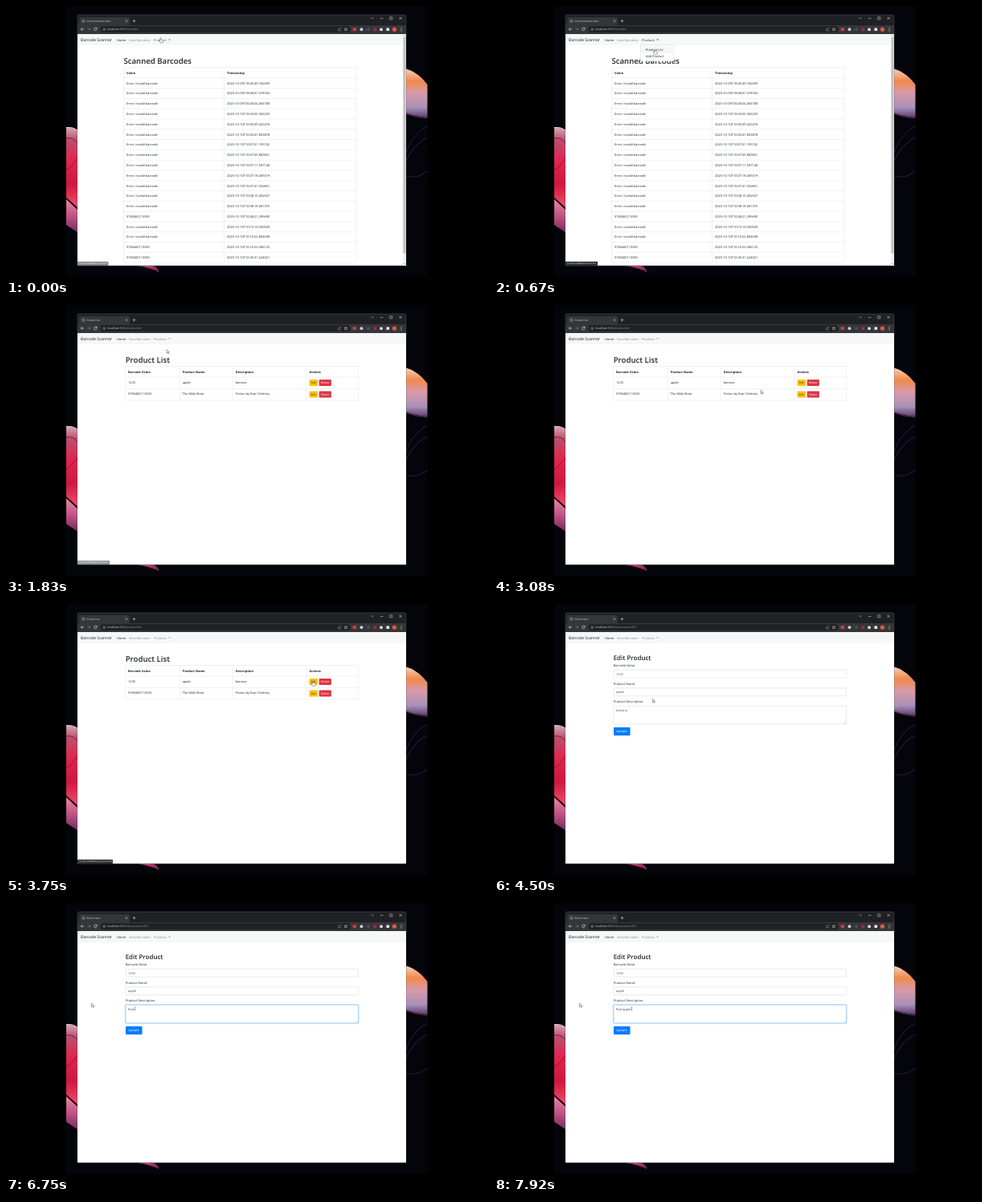
An HTML page that plays this animation: 600x338 px, repeating every 8000 ms.

```html
<!DOCTYPE html>
<html lang="en">
<head>
<meta charset="utf-8">
<title>Barcode Scanner</title>
<style>
html, body { margin: 0; width: 100%; height: 100%; overflow: hidden; background: #000; }
svg { display: block; width: 100vw; height: 100vh; }
text { font-family: "Open Sans", "Noto Sans", sans-serif; text-rendering: geometricPrecision; white-space: pre; }
</style>
</head>
<body>
<svg id="stage" viewBox="0 0 600 338"></svg>
<script>
const LOOP = 8000;
const INK = '#212529', LINE = '#dee2e6', GREY = '#9aa0a6', BAR = '#35363a', DARK = '#202124';

const rect = (x, y, w, h, fill, extra = '') =>
  `<rect x="${x}" y="${y}" width="${w}" height="${h}" fill="${fill}" ${extra}/>`;
const text = (x, y, s, size = 3.95, fill = INK, extra = '') =>
  `<text x="${x}" y="${y}" font-size="${size}" fill="${fill}" ${extra}>${s}</text>`;
const path = (d, stroke, width = 0.6, extra = 'fill="none"') =>
  `<path d="${d}" stroke="${stroke}" stroke-width="${width}" ${extra}/>`;
const dot = (x, y, r, fill, extra = '') => `<circle cx="${x}" cy="${y}" r="${r}" fill="${fill}" ${extra}/>`;
const group = (id, body, extra = '') => `<g id="${id}" ${extra}>${body}</g>`;
const gradient = (id, stops, dir) => `<linearGradient id="${id}" ${dir}>` +
  stops.map(([o, c]) => `<stop offset="${o}" stop-color="${c}"/>`).join('') + '</linearGradient>';

const bold = 'font-weight="700"', semi = 'font-weight="600"';

function wallpaper() {
  return '<defs>' +
    gradient('leftTop', [[0, '#d9a3b4'], [0.15, '#b8506f'], [0.4, '#e0264e'], [0.7, '#cf1740'], [1, '#f0506c']], 'x2="0" y2="1"') +
    gradient('leftLow', [[0, '#e8889f'], [0.5, '#c05285'], [1, '#702a5c']], 'x2="0" y2="1"') +
    gradient('right', [[0, '#f7d2c4'], [0.25, '#f08a4c'], [0.5, '#d99aa8'], [0.8, '#a890b8'], [1, '#5d3f70']], 'x2="0" y2="1"') +
    gradient('foot', [[0, '#3a1230'], [0.6, '#d13a70'], [1, '#7a2350']], '') +
    '</defs>' +
    rect(0, 0, 600, 338, '#000') + rect(75, 0, 450, 338, '#04040b') +
    path('M75 152Q84 151 90 156V252L75 239Z', 'none', 0, 'fill="url(#leftTop)"') +
    path('M75 151.5Q84 150.500 90 156', '#e5d3dc', 1) +
    path('M75 165Q84 163 90 172M75 205Q83 200 90 188', '#8c1238', 1) +
    path('M75 241L90 255V283L75 273Z', 'none', 0, 'fill="url(#leftLow)"') +
    path('M75 240L90 253.500', '#2b0c20', 1.4) +
    path('M497 78Q514 83 524.500 98V139Q510 138 497 133Z', 'none', 0, 'fill="url(#right)"') +
    path('M497 134Q510 139 524.500 140', '#6a3358', 1) +
    path('M497 186Q505 160 524.500 150M497 212Q512 216 524.500 206M497 196Q507 172 524.500 164', '#2a1238', 1.2) +
    path('M155 323H182Q191 327 190 332Q182 326 155 323Z', 'none', 0, 'fill="url(#foot)"');
}

function browser() {
  const white = '#e8eaed';
  return rect(89, 11, 409, 313, DARK, 'rx="1.5" stroke="#55565a" stroke-width=".5"') +
    rect(91, 14, 63, 11, BAR, 'rx="1.8"') + rect(89, 24, 409, 11, BAR) +
    dot(96.500, 18.800, 1.6, 'none', 'stroke="#c4c7cb" stroke-width=".6"') +
    text(100.500, 20, '', 3, white, 'id="tab"') +
    path('M148.700 17.500l2.400 2.400m0-2.400l-2.400 2.400M157.500 18.700h4m-2-2v4', white, 0.5) +
    path('M454.700 14.500l1.500 1.400 1.500-1.400M466 15.500h3.400M477.800 13.800h3v3h-3zM489.500 13.700l3.200 3.200m0-3.200l-3.200 3.200', white, 0.5) +
    path('M97 29h-3.800m1.700-1.700l-1.700 1.700 1.700 1.700', white, 0.6) +
    path('M101.300 29h3.800m-1.700-1.700l1.700 1.700-1.700 1.700', '#85888c', 0.6) +
    path('M112.900 28a1.800 1.800 0 1 0 .2 1.500m0-2.700v1.500h-1.500', white, 0.6) +
    rect(117.500, 25.300, 311, 7.800, DARK, 'rx="3.900"') +
    dot(122.200, 29.200, 1.4, 'none', 'stroke="#b6b9bd" stroke-width=".5"') +
    path('M122.200 29v.9', '#b6b9bd', 0.5) +
    `<text x="126.300" y="30.400" font-size="3.4" fill="${white}">localhost<tspan id="url" fill="${GREY}"></tspan></text>` +
    path('M413.500 28.200v2.600h3v-1.200M414.700 29.300q.5-1.700 2.200-1.700m-.9-.9l1 .9-1 .9', GREY, 0.5) +
    path('M423 27l.6 1.400 1.500.1-1.100 1 .3 1.500-1.300-.8-1.300.8.3-1.500-1.100-1 1.500-.1z', '#d0d2d5', 0.5) +
    rect(431.700, 27.200, 4.200, 3.800, '#d93a3f') + dot(442.500, 29.200, 1.9, '#cfd2d6') +
    dot(451, 29.200, 1.6, '#55585c') + rect(457.300, 27.300, 3.600, 3.800, '#b3242a') +
    rect(465.500, 27.700, 3.200, 3.200, '#f1f3f4') + rect(473.500, 27.500, 3.600, 3.400, '#f1f3f4') +
    dot(483.500, 29.200, 2.6, '#e2593a') +
    [27.5, 29.2, 30.9].map(y => dot(492, y, 0.5, white)).join('') +
    rect(89, 35, 409, 288.700, '#fff') + rect(89, 35, 409, 14, '#f5f8f7') +
    text(93, 44, 'Barcode Scanner', 4.95, '#191b1d') +
    text(138, 43.700, 'Home', 3.95, '#191b1d') +
    text(153, 43.700, 'View Barcodes', 3.95, '#8a8c8c') +
    group('menuLabel', text(184, 43.700, 'Products', 3.95, 'currentColor') +
      '<path d="M202.400 41.600h2.500l-1.250 1.300z" fill="currentColor"/>');
}

const CODE = '9780400113390';
const STAMPS = ('09T18:06:49.746939 09T18:08:01.378763 09T20:00:44.464708 10T10:04:55.302233 ' +
  '10T10:05:09.425374 10T10:05:47.853878 10T10:07:01.195742 10T10:07:05.883831 10T10:07:11.597148 ' +
  '10T10:07:18.405519 10T10:07:41.326851 10T10:08:15.402927 10T10:08:18.281575 10T10:08:21.295690 ' +
  '10T10:10:19.550029 10T10:10:22.804638 10T10:10:25.496125 10T10:35:31.224021').split(' ');

function grid(xs, ys) {
  const [l, r] = [xs[0], xs[xs.length - 1]], [t, b] = [ys[0], ys[ys.length - 1]];
  return path(xs.map(x => `M${x} ${t}V${b}`).join('') + ys.map(y => `M${l} ${y}H${r}`).join(''), LINE, 0.5);
}

function scansPage() {
  const step = 12.79, lines = [76.7];
  let body = text(146.500, 72.300, 'Scanned Barcodes', 9.6, INK, semi) +
    text(150, 84.600, 'Value', 3.95, INK, bold) + text(275, 84.600, 'Timestamp', 3.95, INK, bold);
  STAMPS.forEach((stamp, i) => {
    const y = 97.6 + i * step;
    const ok = i === 13 || i > 15;
    body += text(150, y, ok ? CODE : 'Error: invalid barcode', 3.88) + text(275, y, '2023-10-' + stamp, 3.98);
  });
  for (let i = 0; i <= STAMPS.length; i++) lines.push(89.9 + i * step);
  return grid([146.7, 271.5, 436], lines) + body +
    rect(494, 35, 4, 288.700, '#f1f1f1') + rect(494.500, 39, 3, 269.500, '#c1c1c1') +
    path('M495 37.500l1-1.200 1 1.200zM495 321.300l1 1.200 1-1.200z', 'none', 0, 'fill="#777"');
}

function listPage() {
  const cols = [152, 219.7, 285.7, 377.5];
  const row = (y, cells, extra) => cells.map((s, i) => text(cols[i], y, s, 3.9, INK, extra)).join('');
  const buttons = y => rect(377.500, y, 10.700, 8, '#ffc107', 'rx="1"') + text(379.700, y + 5.2, 'Edit', 3.4) +
    rect(389.700, y, 15.200, 8, '#dc3545', 'rx="1"') + text(391.700, y + 5.2, 'Delete', 3.45, '#fff');
  return text(148.700, 72.300, 'Product List', 9.65, INK, semi) +
    grid([149, 216.3, 282.3, 374, 438.5], [76.5, 90, 104.5, 119]) +
    row(84.6, ['Barcode Value', 'Product Name', 'Description', 'Actions'], bold) +
    row(97.7, ['1235', 'apple', 'banana']) + buttons(93) +
    row(112.2, [CODE, 'The Mild Oboe', 'Fiction by Evan Tolmery']) + buttons(107.6);
}

function editPage() {
  const box = (y, h, extra = '') => rect(149, y, 289.500, h, '#fff', `rx="1" stroke="#ced4da" stroke-width=".5" ${extra}`);
  return text(148.700, 70, 'Edit Product', 7.95, INK, semi) +
    text(148.800, 78.400, 'Barcode Value:') + box(82.3, 9.8) + text(152, 88.700, '1235', 3.95, '#495057') +
    text(148.800, 100.900, 'Product Name:') + box(104.8, 9.8) + text(152, 111.200, 'apple', 3.95, '#495057') +
    text(148.800, 123.400, 'Product Description:') +
    rect(148.500, 126.700, 290.500, 23.500, 'none', 'id="glow" rx="1.4" stroke="#bfdeff" stroke-width="1.3"') +
    box(127.2, 22.5, 'id="area"') +
    path('M435.800 149l2-2m-.7 2l.7-.7', '#8a8a8a', 0.35) +
    '<rect id="mark" y="129.200" height="5.800" fill="#2747b0"/>' +
    '<text x="152" y="133.700" font-size="3.950" fill="#495057"><tspan id="plain"></tspan><tspan id="picked" fill="#fff"></tspan></text>' +
    rect(0, 129.400, 0.45, 5.200, '#111', 'id="caret"') +
    rect(149, 153.800, 20.500, 10.200, '#007bff', 'rx="1"') + text(152.200, 160.400, 'Update', 3.95, '#fff');
}

function menu() {
  return rect(182.500, 48.800, 41.500, 20, '#fff', 'rx="1" stroke="#d3d5d7" stroke-width=".5"') +
    rect(182.800, 50.700, 40.900, 8, '#f4f6f8', 'id="menuHover"') +
    text(188.700, 55.900, 'Product List') + text(188.700, 64.300, 'Add Product');
}

function pointers() {
  return group('arrow', path('M0 0V4.600L1.100 3.600 1.900 5.300 2.700 4.900 1.900 3.300H3.300Z', '#222', 0.4, 'fill="#fff"')) +
    group('hand', path('M-.6.500Q0-.4.600.500V2.500L2.800 3.100Q3.400 3.400 3.200 4.300L2.700 6.300H-.5L-2.200 3.900Q-2.300 3-1.400 3.300L-.6 4Z', '#222', 0.4, 'fill="#fff"')) +
    group('beam', path('M-.9-2.300H.9M0-2.300V2.300M-.9 2.300H.9', '#222', 0.45));
}

const stage = document.getElementById('stage');
stage.innerHTML = wallpaper() + browser() + group('scans', scansPage()) + group('list', listPage()) +
  group('edit', editPage()) + group('menu', menu()) +
  group('status', rect(89, 318.700, 40, 5.200, '#2a2b2e', 'id="statusBox" rx=".8"') +
    text(90.800, 322.400, '', 2.9, '#e8eaed', 'id="statusText"')) +
  group('pointer', pointers());

const el = {};
stage.querySelectorAll('[id]').forEach(n => el[n.id] = n);
const show = (node, on) => node.setAttribute('display', on ? 'inline' : 'none');
const clamp = v => Math.max(0, Math.min(1, v));

const OPEN = 330, TO_LIST = 1580, TO_EDIT = 3850, FOCUS = 5000;
const MOVES = [[0, 192.5, 39.5], [280, 192.5, 39.5], [600, 200.3, 54], [1500, 200.3, 54], [1620, 200, 55.5],
  [2250, 200, 55.5], [2750, 320, 107], [2920, 320, 107], [3080, 332, 106], [3380, 382, 96],
  [3860, 382, 96], [4420, 197.3, 118], [4670, 197.3, 118], [4950, 166.5, 132], [5060, 166.5, 132], [5450, 106.5, 125]];
const KEYS = [6330, 6500, 6620, 6750, 6920, 7080, 7210, 7340, 7500];
const TYPED = 'Red apple', OLD = 'banana';

function pointerAt(t) {
  const i = MOVES.findIndex(m => m[0] > t);
  if (i < 0) return MOVES[MOVES.length - 1].slice(1);
  const [t0, x0, y0] = MOVES[i - 1], [t1, x1, y1] = MOVES[i];
  let k = (t - t0) / (t1 - t0);
  k = k * k * (3 - 2 * k);
  return [x0 + (x1 - x0) * k, y0 + (y1 - y0) * k];
}

function statusAt(t) {
  if (t < 450) return ['barcodes#', 0.55 + 0.45 * clamp(t / 200)];
  if (t < 2080) return ['product-list', 1 - clamp((t - TO_LIST) / 500)];
  if (t > 3340 && t < 4150) return ['edit-product/352', Math.min(clamp((t - 3340) / 150), 1 - clamp((t - TO_EDIT) / 300))];
  return ['', 0];
}

function updateField(t, x) {
  const focused = t >= FOCUS;
  show(el.glow, focused);
  el.area.setAttribute('stroke', focused ? '#80bdff' : '#ced4da');
  const count = KEYS.filter(k => k <= t).length;
  const unit = 13.85 / OLD.length;
  const picked = t > 5060 && !count ? Math.round(clamp((166 - x) / 13.85) * OLD.length) : 0;
  const kept = OLD.length - picked;
  el.plain.textContent = count ? TYPED.slice(0, count) : OLD.slice(0, kept);
  el.picked.textContent = count ? '' : OLD.slice(kept);
  el.mark.setAttribute('x', 152 + kept * unit);
  el.mark.setAttribute('width', picked * unit);
  show(el.caret, focused && !picked);
  if (focused && !picked) el.caret.setAttribute('x', 152.4 + el.plain.getComputedTextLength() + (count === TYPED.length ? 0.6 : 0));
}

function draw(t) {
  const page = t < TO_LIST ? 'scans' : t < TO_EDIT ? 'list' : 'edit';
  ['scans', 'list', 'edit'].forEach(id => show(el[id], id === page));
  const open = t >= OPEN && t < TO_LIST;
  show(el.menu, open);
  show(el.menuHover, t > 480);
  el.menuLabel.style.color = open ? '#303233' : page === 'scans' ? '#5f6262' : '#8a8c8c';
  el.tab.textContent = { scans: 'All Scanned Barcodes', list: 'Product List', edit: 'Edit Product' }[page];
  el.url.textContent = ':8080/' + { scans: 'barcodes', list: 'product-list', edit: 'edit-product/352' }[page];

  const [link, alpha] = statusAt(t);
  el.statusText.textContent = 'localhost:8080/' + link;
  el.statusBox.setAttribute('width', link.length > 12 ? 44 : link.length > 9 ? 40 : 38.5);
  el.status.setAttribute('opacity', alpha);

  const [x, y] = pointerAt(t);
  const hand = page === 'scans' || (page === 'list' && x > 377 && y < 101);
  const beam = page === 'edit' && x > 149 && y > 127;
  show(el.hand, hand);
  show(el.beam, beam);
  show(el.arrow, !hand && !beam);
  el.pointer.setAttribute('transform', `translate(${x} ${y})`);
  if (page === 'edit') updateField(t, x);
}

const start = performance.now();
function tick() {
  draw((performance.now() - start) % LOOP);
  requestAnimationFrame(tick);
}
tick();
</script>
</body>
</html>
```
